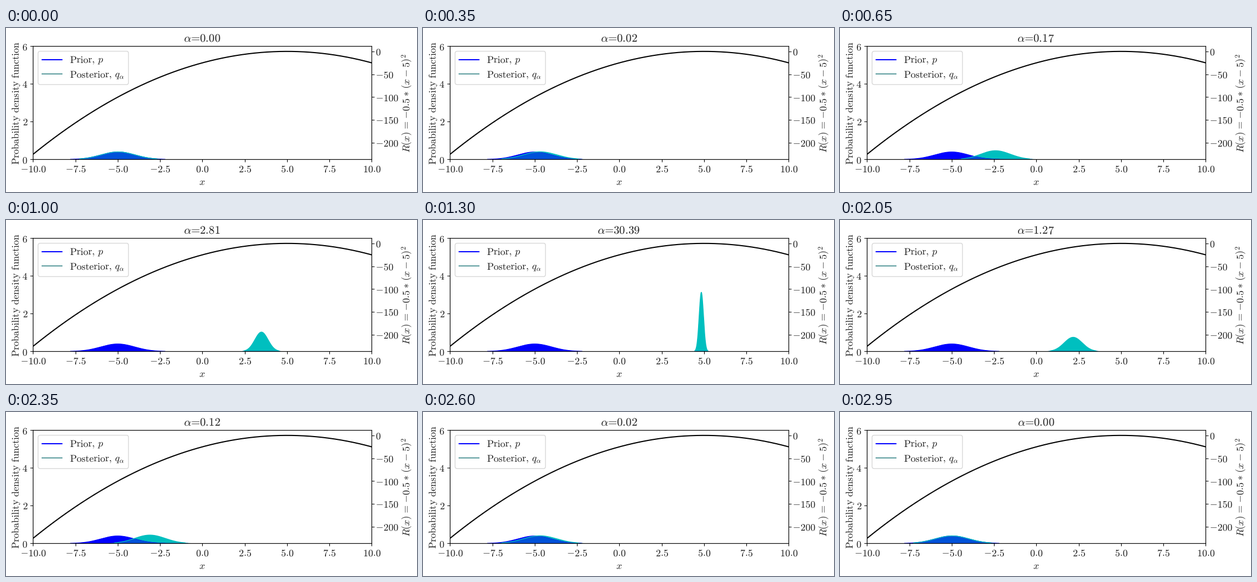
Animation of 750x300 px, one loop 3000 ms. Source, as a matplotlib script:

```python
import numpy as np
import matplotlib.pyplot as plt
from matplotlib.animation import FuncAnimation

W, H, DPI = 750, 300, 100
FRAMES, INTERVAL = 60, 50
BLUE, CYAN, MIX = (0, 0, 1), (0, 0.75, 0.75), (0, 0.32, 0.85)

plt.rcParams.update({
    "font.family": "DejaVu Sans",
    "font.size": 13,
    "mathtext.fontset": "cm",
    "text.hinting": "none",
    "text.color": "0.12",
    "xtick.labelcolor": "0.12",
    "ytick.labelcolor": "0.12",
    "lines.linewidth": 1.5,
})

fig = plt.figure(figsize=(W / DPI, H / DPI), dpi=DPI, facecolor="white")
ax = fig.add_axes([49.4 / W, 59.6 / H, 618 / W, 207 / H])
ax.set(xlim=(-10, 10), ylim=(0, 6))
right = ax.twinx()
right.set_ylim(-236.25, 11.25)

x_ticks = np.arange(-10, 10.1, 2.5)
ax.set_xticks(x_ticks, [f"${v:.1f}$" for v in x_ticks])
ax.set_yticks(range(0, 7, 2), [f"${v}$" for v in range(0, 7, 2)])
right.set_yticks(range(-200, 1, 50), [f"${v}$" for v in range(-200, 1, 50)])
right.tick_params(axis="y", pad=1.5)


def label(x, y, text, **kw):
    """Text centred on x, y in pixels from the top left, y on the baseline."""
    return fig.text(x / W, 1 - y / H, text, ha="center", va="baseline",
                    rotation_mode="anchor", **kw)


def gauss(x, mean, precision):
    return np.sqrt(precision / (2 * np.pi)) * np.exp(-precision * (x - mean) ** 2 / 2)


def area(y):
    """Closed outline between the axis and y."""
    return np.column_stack([np.r_[x[0], x, x[-1]], np.r_[0, y, 0]])


def alpha_at(i):
    step = min(i, FRAMES - 1 - i)
    return 10 ** (-3 + 5 * step / (FRAMES // 2 - 1))


label(24, 137, r"$\mathrm{Probability\hspace{0.38}density\hspace{0.38}function}$",
      rotation=90, fontsize=13.1)
label(736.5, 137,
      r"$R(x)\hspace{0.12}=\hspace{0.12}{-}0.5\hspace{0.05}*\hspace{0.05}"
      r"(x\hspace{0.05}-\hspace{0.05}5)^2$", rotation=90, fontsize=13.1)
label(358, 288, "$x$")
title = label(357.5, 26, "", fontsize=15)

x = np.linspace(-10, 10, 2001)
prior = gauss(x, -5, 1)
right.plot(x, -(x - 5) ** 2, color="black")

ax.fill(x, prior, color=BLUE, lw=0)
ax.plot(x, np.where(prior > 0.008, prior, np.nan), color=BLUE, lw=0.8)
post_fill, = ax.fill(x, prior, color=CYAN, lw=0)
both_fill, = ax.fill(x, prior, color=MIX, lw=0)
both_line, = ax.plot([], [], color=MIX, lw=1)
post_line, = ax.plot([], [], color=CYAN, lw=1)

keys = [plt.Line2D([], [], color=c) for c in (BLUE, "cadetblue")]
ax.legend(keys, [r"$\mathrm{Prior,}\,p$", r"$\mathrm{Posterior,}\,q_\alpha$"],
          loc="upper left", labelspacing=0.35)


def update(i):
    a = alpha_at(i)
    precision = 1 + 2 * a
    post = gauss(x, (10 * a - 5) / precision, precision)
    post_fill.set_xy(area(post))
    both_fill.set_xy(area(np.minimum(prior, post)))
    both_line.set_data(x, np.where((post > prior) & (post > 0.02), prior, np.nan))
    post_line.set_data(x, np.where(post > 0.03, post, np.nan))
    title.set_text(rf"$\alpha\hspace{{-0.2}}=\hspace{{-0.2}}{a:.2f}$")
    return post_fill, both_fill, both_line, post_line, title


anim = FuncAnimation(fig, update, frames=FRAMES, interval=INTERVAL,
                     repeat=True, repeat_delay=0, blit=False)
plt.show()
```
